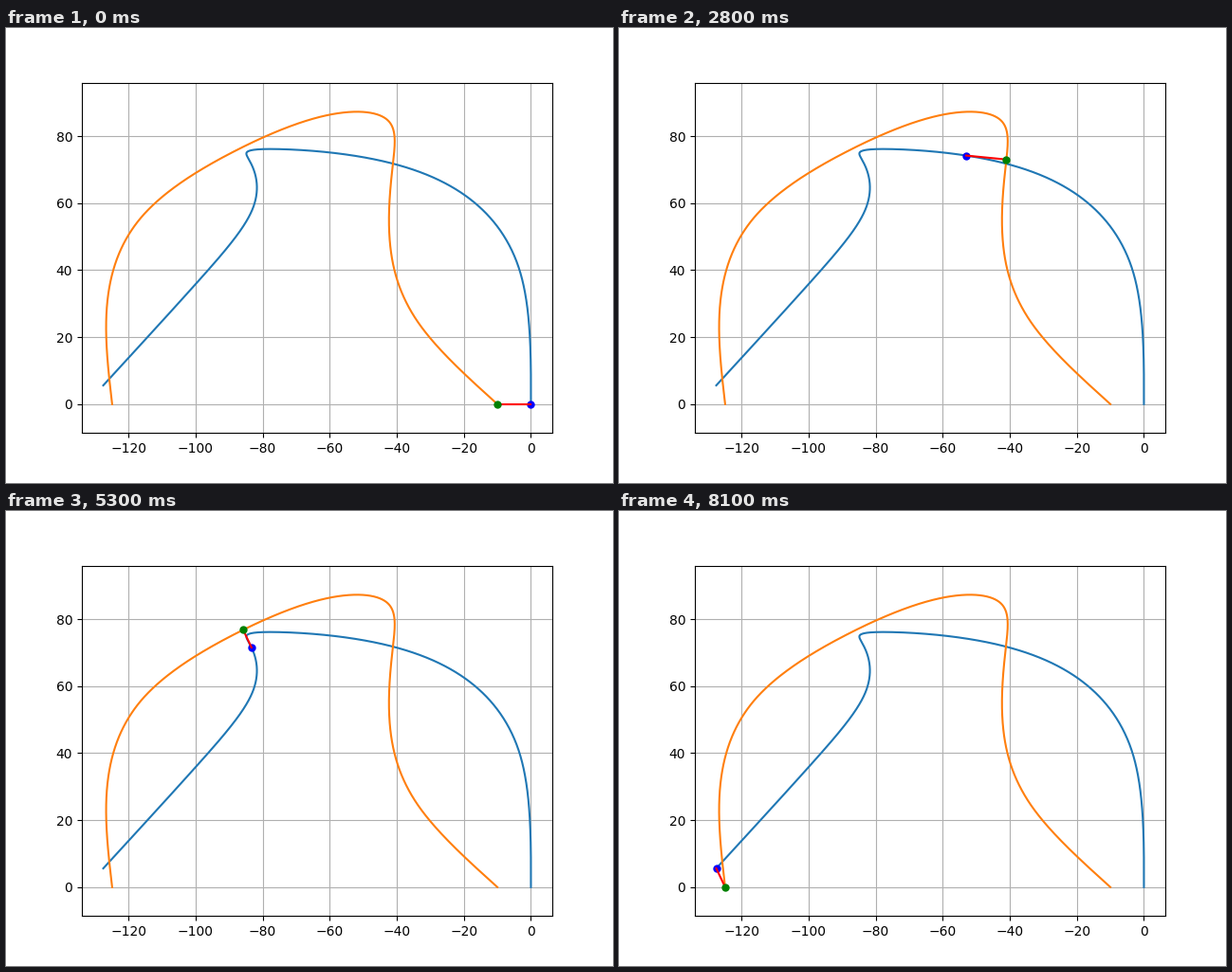
Write a matplotlib script that moves like this. It is 640 px wide and 480 px high and loops after 10000 ms.

```python
import numpy as np
import matplotlib.pyplot as plt
from matplotlib.animation import FuncAnimation

STEP_MS = 100
FRAMES = 100
LAST_MOVE = 81
KEY_STEPS = 9

# Key positions, evenly spaced in time.
RIGHT_KEYS = [
    (0, 0), (-3.3, 39.7), (-21.8, 63.75), (-49.8, 73.65), (-75, 76.1),
    (-84.65, 75.25), (-82.95, 70.65), (-83.2, 57.8), (-99.4, 36.5),
    (-127.55, 5.6),
]
LEFT_KEYS = [
    (-10, 0), (-33.5, 24.2), (-42.05, 48.2), (-41.25, 70.9), (-42.9, 84.9),
    (-61.1, 86.15), (-89.15, 75.1), (-116, 56), (-126.4, 29.9),
    (-124.9, 0),
]


def natural_spline(keys):
    """Return a natural cubic spline through keys one time unit apart."""
    keys = np.array(keys, float)
    n = len(keys)
    matrix = 4 * np.eye(n) + np.eye(n, k=1) + np.eye(n, k=-1)
    matrix[[0, -1]] = np.eye(n)[[0, -1]]
    rhs = np.zeros_like(keys)
    rhs[1:-1] = 6 * np.diff(keys, n=2, axis=0)
    bend = np.linalg.solve(matrix, rhs)

    def evaluate(t):
        i = np.minimum(np.floor(t).astype(int), n - 2)
        b = (t - i)[:, None]
        a = 1 - b
        straight = a * keys[i] + b * keys[i + 1]
        return straight + ((a**3 - a) * bend[i] + (b**3 - b) * bend[i + 1]) / 6

    return evaluate


right_path, left_path = natural_spline(RIGHT_KEYS), natural_spline(LEFT_KEYS)
fine = np.linspace(0, LAST_MOVE / KEY_STEPS, 1000)
steps = np.arange(LAST_MOVE + 1) / KEY_STEPS
right, left = right_path(steps), left_path(steps)

fig, ax = plt.subplots(figsize=(6.4, 4.8), dpi=100)
for path in (right_path, left_path):
    ax.plot(*path(fine).T)
ax.set_xlim(-133.93, 6.378)
ax.set_ylim(-8.594, 95.954)
ax.set_xticks(range(-120, 1, 20))
ax.set_yticks(range(0, 81, 20))
ax.grid()

right_dot, = ax.plot([], [], "bo", markersize=5)
link, = ax.plot([], [], "r-")
left_dot, = ax.plot([], [], "go", markersize=5)


def update(frame):
    i = min(frame, LAST_MOVE)
    right_dot.set_data(right[i:i + 1].T)
    left_dot.set_data(left[i:i + 1].T)
    link.set_data(np.array([right[i], left[i]]).T)
    return right_dot, link, left_dot


anim = FuncAnimation(fig, update, frames=FRAMES, interval=STEP_MS,
                     repeat=True, repeat_delay=0)
plt.show()
```
